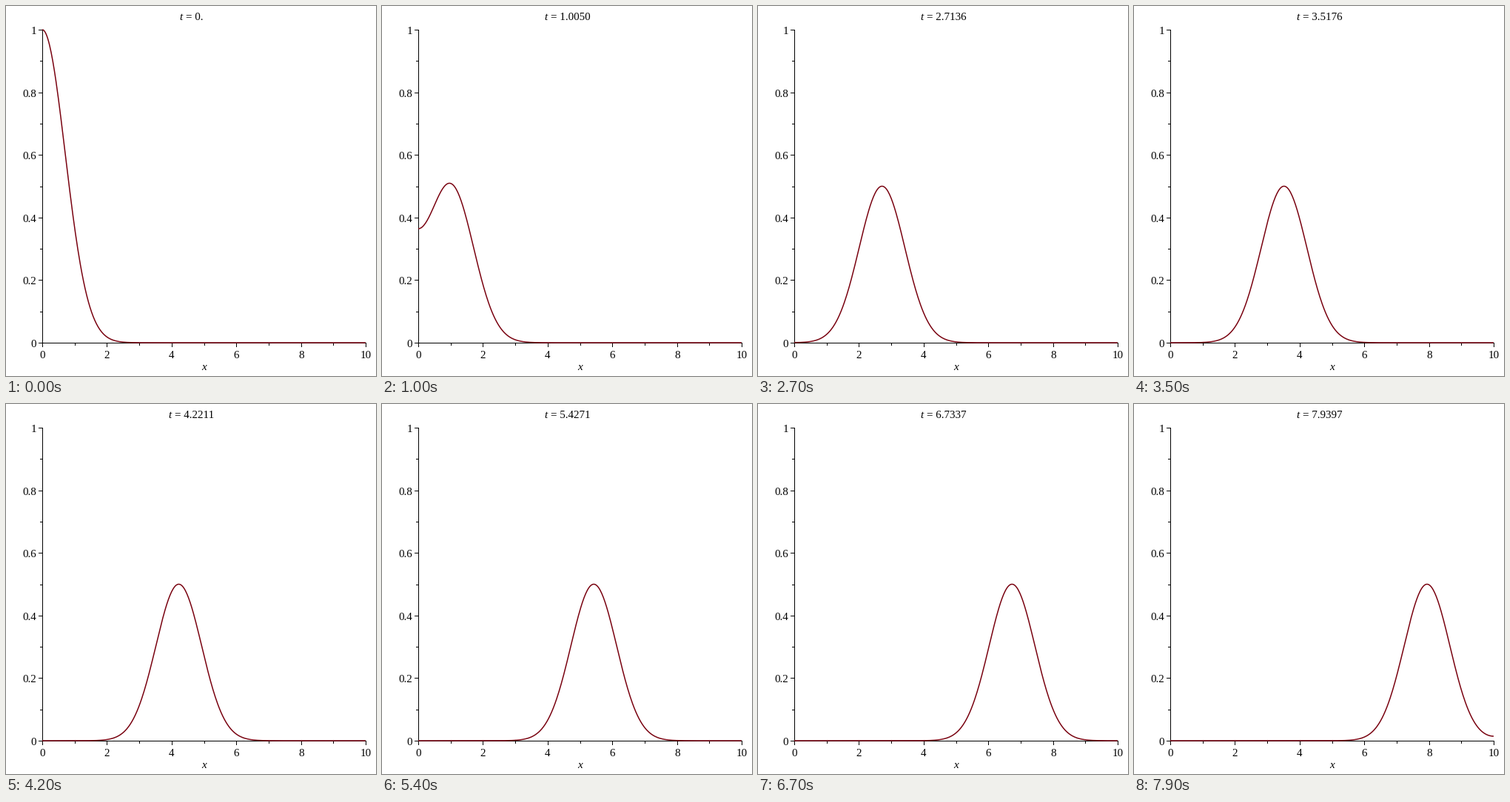
These frames come from a looping animation (500 px wide and 500 px high, 8000 ms). A matplotlib script:

```python
import numpy as np
import matplotlib.pyplot as plt
from matplotlib.animation import FuncAnimation

SIZE, DPI = 500, 100
FRAMES, INTERVAL = 80, 100
DT = 20 / 199
EM = 15                       # font size in pixels
LEFT, RIGHT, TOP, BOTTOM = 49, 486, 32, 455
CURVE = "#78000e"


def pt(px):
    return px * 72 / DPI


def sx(x):
    return LEFT + (RIGHT - LEFT) * x / 10


def sy(y):
    return BOTTOM - (BOTTOM - TOP) * y


plt.rcParams["font.family"] = "Liberation Serif"
fig = plt.figure(figsize=(SIZE / DPI, SIZE / DPI), dpi=DPI, facecolor="white")
ax = fig.add_axes([0, 0, 1, 1])
ax.set_xlim(0, SIZE)
ax.set_ylim(SIZE, 0)
ax.axis("off")


def bar(x, y, w, h):
    """Fill a block of whole pixels."""
    ax.add_patch(plt.Rectangle((x, y), w, h, fc="black", lw=0, aa=False))


def label(x, y, s, ha="center", style="normal"):
    return ax.text(x, y, s, ha=ha, va="baseline", fontsize=pt(EM), style=style)


bar(LEFT, TOP, 1, BOTTOM - TOP + 1)
bar(LEFT, BOTTOM, RIGHT - LEFT + 1, 1)
for i in range(11):
    major = i % 2 == 0
    length = 5 if major else 3
    x, y = round(sx(i)), round(sy(i / 10))
    bar(x, BOTTOM, 1, length + 1)
    bar(LEFT - length, y, length + 1, 1)
    if major:
        label(x, 476, str(i))
        label(41, y + 6, f"{i / 10:g}", ha="right")
label(268, 492, "x", style="italic")

xs = np.linspace(0, 10, 401)
curve, = ax.plot([], [], color=CURVE, lw=pt(1.5), zorder=3, snap=False,
                 solid_capstyle="butt", solid_joinstyle="round")
name = label(0, 19, "t", ha="left", style="italic")
value = label(0, 19, "", ha="left")


def draw(k):
    t = k * DT
    # travelling pulse with reflecting walls at x = 0 and x = 10
    u = sum(np.exp(-(xs - c) ** 2) for c in (t, -t, 20 - t)) / 2
    curve.set_data(sx(xs), sy(u))

    number = f"{t:#.5g}" if k else "0."
    width = EM * (1.342 + 0.25 + 0.5 * (len(number) - 1))
    start = 250.5 - width / 2
    name.set_x(start)
    value.set_x(start + 0.528 * EM)
    value.set_text("= " + number)
    return curve, name, value


anim = FuncAnimation(fig, draw, frames=FRAMES, interval=INTERVAL,
                     repeat=True, repeat_delay=0)
plt.show()
```
